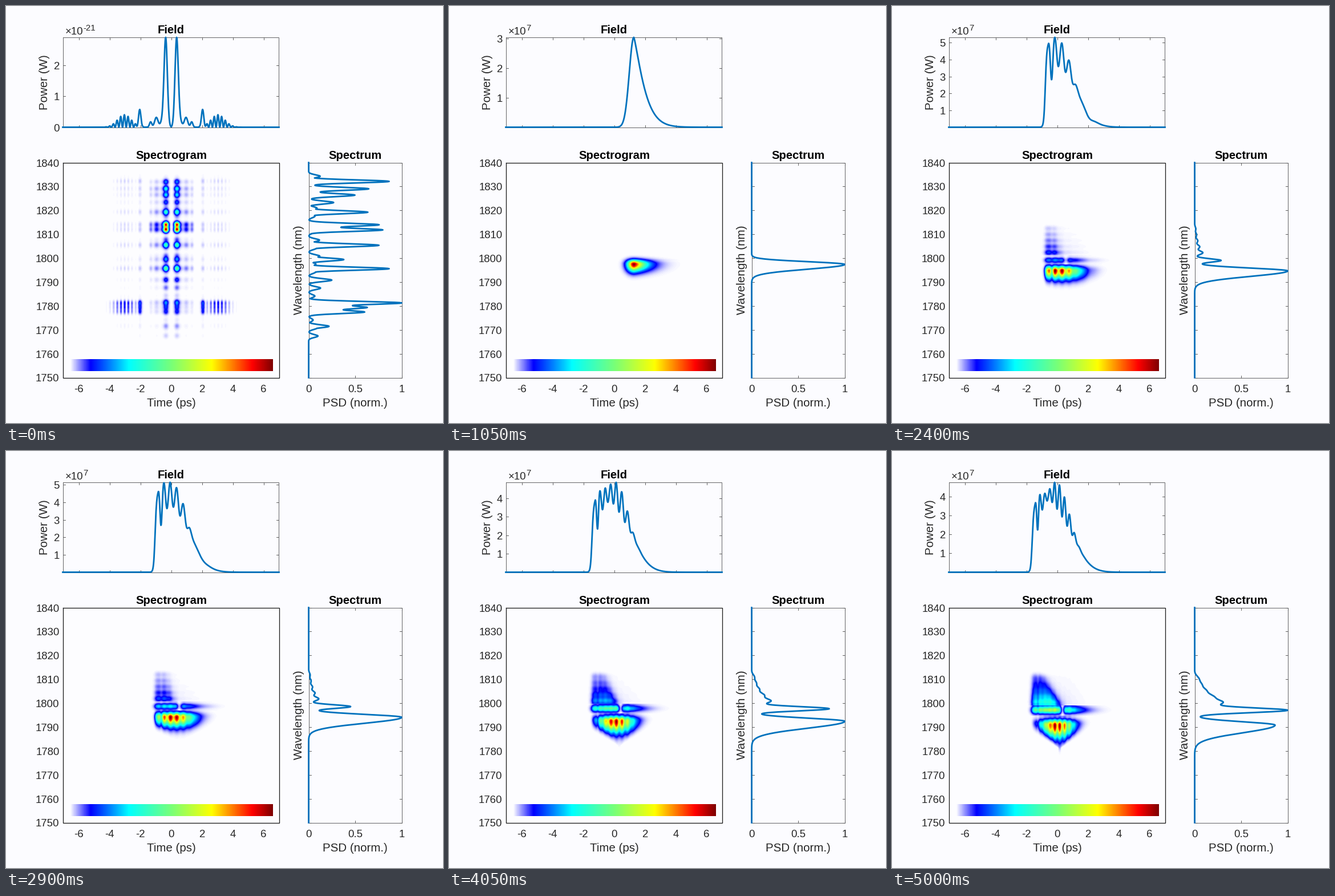
Recreate the animation shown at these times as a matplotlib script. Size 766 by 731 pixels, loop 5.05 s.

```python
import math
import numpy as np
import matplotlib.pyplot as plt
from matplotlib.animation import FuncAnimation
from matplotlib.colors import LinearSegmentedColormap

W, H, DPI = 766, 731, 100
FRAMES, STEP = 101, 50
BG, BLUE, INK, GREY = "#fcfcff", "#0072bd", "#262626", "#555555"
T0, PX_PS = 289, 27.0                      # zero time, pixels per ps
BASE, TALL = 212, 157.5                    # field panel baseline and height
LEFT, RIGHT, TOP, BOTTOM = 99, 478, 274, 651
SX, SW = 530, 163                          # spectrum panel
FORMED, SPLIT = 21, 37                     # pulse has formed / has broken into fringes

fx = np.arange(LEFT, RIGHT + .01, .5)
sy = np.arange(TOP, BOTTOM + .01, .5)
gx = np.arange(LEFT, RIGHT) + .5
gy = np.arange(TOP, BOTTOM) + .5


def bell(x, mid, sigma):
    return np.exp(-((x - mid) / sigma) ** 2 / 2)


def rise(x, mid, soft):
    return 1 / (1 + np.exp(-np.clip((x - mid) / soft, -40, 40)))


def unit(v):
    return v / v.max()


def blur(v, sigma):
    k = bell(np.arange(-15, 16), 0, sigma)
    return np.convolve(v, k / k.sum(), "same")


# Start: a field symmetric about zero time with a broad, spiky spectrum

def noise_field(x):
    d = np.abs(x - T0)
    bumps = ((9.6, 1, 2.9), (16, .06, 3), (26, .11, 3), (36, .06, 2), (55, .19, 2))
    beat = .14 * np.exp(-((d - 82) / 17) ** 2) * np.cos(np.pi * (d - 82) / 6.5) ** 2
    return unit(beat + sum(h * bell(d, c, s) for c, h, s in bumps))


def noise_spec(y):
    peaks = ((307, .87), (320, .65), (331, .5), (344, .27), (361, .64), (383, .76), (392, .8),
             (419, .76), (444, .38), (460, .87), (480, .25), (520, 1), (528, .62), (536, .6), (561, .22))
    rng = np.random.default_rng(4)
    small = sum(rng.uniform(.03, .13) * bell(y, c, 2.6) for c in range(298, 580, 14))
    return unit(np.maximum(small, sum(h * bell(y, c, 2.6) for c, h in peaks)))


def noise_map():
    core = (.5 + .6 * bell(gy, 387, 12)) * (1 - .65 * rise(gy, 500, 6)) * rise(gy, 310, 5)
    wing = .12 + .8 * bell(gy, 530, 12)
    far = np.abs(gx - T0) > 45
    gate = np.where(far, wing[:, None], core[:, None])
    return unit(blur(noise_spec(gy), 2)[:, None] * noise_field(gx) * gate)


class Pulse:
    """One pulse whose front creeps ahead while its fringes multiply."""

    def __init__(self, n):
        n = max(n, FORMED)
        self.b = b = min((n - FORMED) / (SPLIT - FORMED), 1)
        self.t = t = max(n - SPLIT, 0)
        self.a = a = t / (FRAMES - 1 - SPLIT)
        self.front = 244 + 40.5 * math.exp(-t / 35) + 39 * (1 - b)
        self.main = 452.5 + 9.5 * b + 18 * a ** 1.3
        self.side = 442 + 12 * a ** .7
        self.power = (3.035 + b * 2.535 - 1.02 * (1 - math.exp(-t / 38))) * 1e7

    def field(self, x):
        a, b, t = self.a, self.b, self.t
        d = x - self.front
        single = np.where(d < 0, bell(d, 0, 8), np.exp(-(np.abs(d) / 21.5) ** 1.25))
        gap = 8 + 5.5 * math.exp(-t / 20)
        chirp = .4 - .35 * a
        k = (np.sqrt(gap ** 2 + 4 * chirp * np.maximum(d, 0)) - gap) / (2 * chirp)
        mid = 289 - 7 * a * a + 39 * (1 - b)
        hump = bell(x, mid, np.where(x < mid, 40, 30))
        depth = .2 * rise(-x, -318, 5) * (1 - .7 * a * np.exp(-((k - 2.5) / 1.5) ** 2))
        depth = depth + .15 * np.exp(-((k - .5) / .35) ** 2)
        notch = 1 - .9 * math.exp(-t / 10) * bell(x, 347, 6)
        split = unit(rise(d, -5.5, 1.3) * hump * (1 + depth * np.cos(2 * np.pi * k)) * notch)
        return unit(b * split + (1 - b) * single)

    def spec(self, y):
        a = self.a
        v = bell(y, self.main, np.where(y > self.main, 8.3 + 5 * a ** .8, 4.8 + a))
        v = v + self.b * (.1 + 1.05 * a) * bell(y, self.side, 2.7 + 1.5 * a)
        for j in range(5):
            size = (.08 + .25 * a * a) * .62 ** j
            v = v + self.b * size * bell(y, self.side - 13.5 - 10.5 * j, 3 + 1.8 * a)
        return unit(v)

    def map(self):
        a, b = self.a, self.b
        late = math.exp(-self.t / 8)
        null = self.side + .4 * (self.main - self.side)
        fan = self.side - 8.5
        x, y = gx[None, :], gy[:, None]
        fall = np.clip((y - null) / (58 + 30 * late), 0, 1)
        wide = np.maximum((64 - 16 * a + 60 * late) * (1 - fall ** 1.6), 3)
        bowl = np.exp(-2 * np.minimum(np.abs(x - 308 + 15 * a) / wide, 5) ** 3)
        pinch = b * (.9 - .6 * late)
        band = (1 - .2 * b) * (1 - pinch * bell(x, 305 - 7 * a, 3.5)) + 0 * y
        edge = np.maximum(290 - .5 * a * (fan - y), self.front + 10)
        floor = 1 - b * (.97 - .27 * late)
        upper = floor + (1 - floor) * rise(-x, -edge, 4)
        p = self.field(gx)
        q = .4 * p + .6 * blur(p, 3)
        shares = np.where(y > null, p * bowl, q * np.where(y > fan, 1, upper))
        m = self.spec(gy)[:, None] * shares / (shares.sum(1, keepdims=True) + .15 * p.sum())
        return unit(m * np.where((y <= null) & (y > fan), band, 1))


def grow(start, end, w):
    """Geometric passage from noise to pulse, as under repeated gain."""
    if w <= 0:
        return start
    return unit(np.maximum(start, 1e-3) ** (1 - w) * np.maximum(end, 1e-5) ** w)


NOISE = noise_field(fx), noise_spec(sy), noise_map()


def scene(n):
    p = Pulse(n)
    now = p.field(fx), p.spec(sy), p.map()
    if n >= FORMED:
        return (*now, p.power)
    w = math.sin(math.pi / 2 * n / FORMED)
    power = 10 ** np.interp(n, [0, 17, FORMED], [math.log10(2.9e-21), 5.8, math.log10(p.power)])
    return (*[grow(s, e, w) for s, e in zip(NOISE, now)], power)


plt.rcParams["font.family"] = "Liberation Sans"
fig = plt.figure(figsize=(W / DPI, H / DPI), dpi=DPI, facecolor=BG)
ax = fig.add_axes([0, 0, 1, 1])
ax.set_axis_off()


def px(v):
    return v * 72 / DPI


def text(x, y, s, size=18.6, color=INK, **kw):
    kw.setdefault("va", "baseline")
    kw.setdefault("ha", "center")
    return ax.text(x, y, s, fontsize=px(size), color=color, **kw)


def box(x0, y0, x1, y1, color, lw, z):
    ax.plot([x0, x1, x1, x0, x0], [y0, y0, y1, y1, y0], color=color, lw=px(lw),
            solid_joinstyle="miter", zorder=z)


def segs(parts):
    """Separate segments as one broken line."""
    xs, ys = [], []
    for x0, y0, x1, y1 in parts:
        xs += [x0, x1, np.nan]
        ys += [y0, y1, np.nan]
    return xs, ys


jet = LinearSegmentedColormap.from_list("heat", [
    (0, "#fdfdff"), (.1, "#0000ff"), (.29, "#00ffff"), (.5, "#78ff78"),
    (.7, "#ffff00"), (.9, "#ff0000"), (1, "#800000")], N=512)

heat = ax.imshow(np.zeros((len(gy), len(gx))), cmap=jet, vmin=0, vmax=1, aspect="auto",
                 extent=(LEFT, RIGHT, BOTTOM, TOP), interpolation="nearest", zorder=1)
ax.imshow(np.linspace(0, 1, 356)[None, :], cmap=jet, vmin=0, vmax=1, aspect="auto",
          extent=(111, 467, 639.5, 618.5), interpolation="nearest", zorder=2)
# whole coordinates are pixel centres
ax.set_xlim(-.5, W - .5)
ax.set_ylim(H - .5, -.5)

box(LEFT, TOP, RIGHT, BOTTOM, "#1a1a1a", 1.3, 3)
box(LEFT, BASE - TALL, RIGHT - 1, BASE, GREY, .9, 3)
box(SX, TOP, SX + SW, BOTTOM, GREY, .9, 3)

marks = []
for t in range(-6, 7, 2):
    x = T0 + t * PX_PS
    text(x, 676.5, str(t))
    marks += [(x, BASE, x, BASE - 4), (x, BASE - TALL, x, BASE - TALL + 4)]
for k in range(10):
    y = TOP + k * (BASE * 0 + BOTTOM - TOP) / 9
    text(93, y + 7, str(1840 - 10 * k), ha="right")
    marks += [(SX, y, SX + 4, y), (SX + SW, y, SX + SW - 4, y)]
for v in (0, .5, 1):
    x = SX + v * SW
    text(x, 676.5, f"{v:g}")
    marks += [(x, BOTTOM, x, BOTTOM - 4), (x, TOP, x, TOP + 4)]
ax.plot(*segs(marks), color=GREY, lw=px(.9), zorder=3)

for x, y, s in ((T0, 48, "Field"), (T0, 267, "Spectrogram"), (SX + SW / 2, 267, "Spectrum")):
    text(x, y, s, 20.3, "black", weight="bold")
text(T0, 702, "Time (ps)", 20.5)
text(SX + SW / 2, 702, "PSD (norm.)", 20.5)
text(513, 462, "Wavelength (nm)", 20.6, rotation=90, va="center")
ylabel = text(67.5, 133.5, "Power (W)", 20.5, rotation=90, va="center")
times = text(134.5, 50, "×10", ha="right")
power10 = text(134.5, 42.5, "", 15, ha="left")
labels = [text(93, 0, "", ha="right") for _ in range(8)]
yticks, = ax.plot([], [], color=GREY, lw=px(.9), zorder=3)
curve = dict(color=BLUE, lw=px(2.8), solid_joinstyle="round", zorder=4)
field, = ax.plot([], [], **curve)
spec, = ax.plot([], [], **curve)


def set_scale(top, zero):
    e = math.floor(math.log10(top))
    plain = -2 <= e <= 3
    m = top if plain else top / 10.0 ** e
    decade = 10.0 ** (math.floor(math.log10(m)) - 1)
    step = next(k * decade for k in (1, 2, 5, 10, 20, 50) if m / (k * decade) < 5.7)
    vals = [k * step for k in range(0 if zero else 1, int(m / step) + 1)]
    parts, wide = [], 0
    for i, lab in enumerate(labels):
        if i >= len(vals):
            lab.set_text("")
            continue
        y = BASE - TALL * vals[i] / m
        s = f"{vals[i]:.6g}"
        lab.set_text(s)
        lab.set_y(y + 7)
        wide = max(wide, sum(.278 if c == "." else .556 for c in s) * 18.6)
        parts += [(LEFT, y, LEFT + 4, y), (RIGHT - 1, y, RIGHT - 5, y)]
    yticks.set_data(*segs(parts))
    ylabel.set_x(67.5 + 10.3 - wide)
    times.set_text("" if plain else "×10")
    power10.set_text("" if plain else str(e))


def draw(n):
    f, s, m, power = scene(n)
    field.set_data(fx, BASE - TALL * f)
    spec.set_data(SX + SW * s, sy)
    heat.set_data(m)
    set_scale(power, n < 12)
    return field, spec, heat


anim = FuncAnimation(fig, draw, frames=FRAMES, interval=STEP, repeat=True, repeat_delay=0, blit=False)
plt.show()
```
